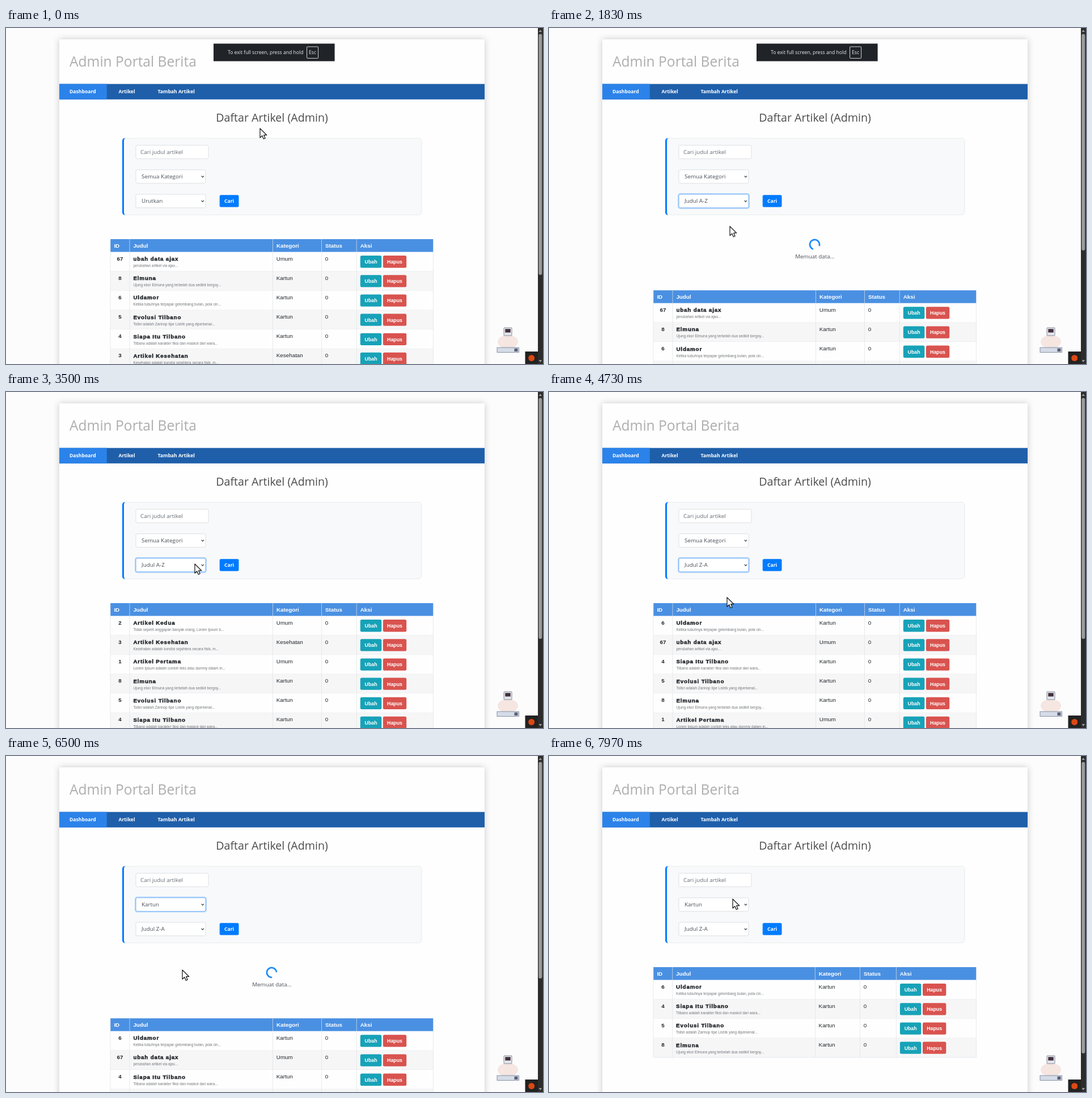
Write an HTML page that moves like this. It is 947x592 px and loops after 8000 ms.

```html
<!DOCTYPE html>
<html lang="id">
<head>
<meta charset="utf-8">
<title>Admin Portal Berita</title>
<style>
  html, body { margin: 0; width: 100%; height: 100%; overflow: hidden; background: #fcfcfd; }
  svg { display: block; width: 947px; height: 592px; }
  text { font: 9.83px "Open Sans", sans-serif; fill: #495057; white-space: pre; }
  .brand { font-size: 24.56px; fill: #aeaeae; }
  .heading { font-size: 19.65px; fill: #4c4c4c; text-anchor: middle; }
  .nav { font-size: 8.6px; font-weight: 700; fill: #fff; }
  .hint { font-size: 8.65px; fill: #eceef0; }
  .mid { text-anchor: middle; }
  .cell { font-family: "Liberation Sans", Arial, sans-serif; fill: #212529; }
  .bold { font-weight: 700; }
  .head { font-weight: 700; fill: #fff; }
  .title { font-weight: 700; letter-spacing: .83px; stroke: #212529; stroke-width: .45px; }
  .sub { font-size: 6.46px; fill: #74777b; }
  .btn { font-size: 8.8px; font-weight: 700; fill: #fff; text-anchor: middle; }
  .shadow { filter: drop-shadow(0 0 6px rgba(0, 0, 0, .2)); }
  #cursor { animation: move 8s infinite ease-in-out; }
  #banner { animation: leave 8s infinite linear; }
  @keyframes move {
    0%, 1.5% { transform: translate(448px, 177px); }
    12.125%, 14.5% { transform: translate(308px, 292px); }
    20.5%, 22% { transform: translate(318px, 350px); }
    30%, 36% { transform: translate(358px, 328px); }
    43.75%, 46% { transform: translate(333px, 303px); }
    50.5%, 60% { transform: translate(314px, 362px); }
    68%, 71% { transform: translate(322px, 257px); }
    79%, 84% { transform: translate(311px, 377px); }
    96%, 100% { transform: translate(324px, 252px); }
  }
  @keyframes leave {
    0%, 36% { opacity: 1; }
    38.5%, 99.99% { opacity: 0; }
    100% { opacity: 1; }
  }
</style>
</head>
<body>
<script>
const LOOP = 8000;
const percent = ms => (ms / LOOP * 100).toFixed(3) + '%';
let rules = '', ruleCount = 0;

function animate(frames, timing, content) {
  const name = 'k' + ruleCount++;
  rules += `@keyframes ${name}{${frames}} .${name}{animation:${name} ${LOOP}ms ${timing} infinite}`;
  return `<g class="${name}">${content}</g>`;
}

const during = (start, end, content) => animate(
  `0%{visibility:hidden}${percent(start)}{visibility:visible}${percent(end)}{visibility:${end < LOOP ? 'hidden' : 'visible'}}`,
  'step-end', content);

const rect = (x, y, w, h, fill, extra = '') =>
  `<rect x="${x}" y="${y}" width="${w}" height="${h}" fill="${fill}" ${extra}/>`;
const text = (x, y, content, cls = '') => `<text x="${x}" y="${y}" class="${cls}">${content}</text>`;
const line = (d, color, width = .7) => `<path d="${d}" fill="none" stroke="${color}" stroke-width="${width}"/>`;

const articles = {
  67: ['ubah data ajax', 'perubahan artikel via ajax...', 'Umum'],
  8: ['Elmuna', 'Ujung ekor Elmuna yang terbelah dua sedikit bergoy...', 'Kartun'],
  6: ['Uldamor', 'Ketika tubuhnya terpapar gelombang bulan, pola cin...', 'Kartun'],
  5: ['Evolusi Tilbano', 'Tolbri adalah Zarinop tipe Listrik yang diperkenal...', 'Kartun'],
  4: ['Siapa Itu Tilbano', 'Tilbano adalah karakter fiksi dan maskot dari wara...', 'Kartun'],
  3: ['Artikel Kesehatan', 'Kesehatan adalah kondisi sejahtera secara fisik, m...', 'Kesehatan'],
  2: ['Artikel Kedua', 'Tidak seperti anggapan banyak orang, Lorem Ipsum b...', 'Umum'],
  1: ['Artikel Pertama', 'Lorem Ipsum adalah contoh teks atau dummy dalam in...', 'Umum']
};
const LEFT = 184, RIGHT = 753.5, HEAD = 22.5, ROW = 34.15;
const wideColumns = [LEFT, 218, 470.5, 556.5, 618.3];
const kartunColumns = [LEFT, 217.7, 469.3, 548.5, 612.4];

function button(x, y, w, label, fill) {
  return rect(x, y, w, 21.3, fill, 'rx="2.5"') + text(x + w / 2, y + 14, label, 'cell btn');
}

function row(id, index, top, cols) {
  const [title, sub, category] = articles[id];
  const y = top + HEAD + index * ROW;
  return rect(LEFT, y, RIGHT - LEFT, ROW, index % 2 ? '#f6f6f7' : '#fefefe') +
    line(`M${LEFT} ${y + ROW}H${RIGHT}`, '#dee2e6') +
    text(201, y + 15, id, 'cell bold mid') +
    text(cols[1] + 6.4, y + 15.6, title, 'cell title') +
    text(cols[1] + 6.4, y + 26.6, sub, 'cell sub') +
    text(cols[2] + 6.3, y + 15, category, 'cell') +
    text(cols[3] + 6.3, y + 15, '0', 'cell') +
    button(cols[4] + 6.5, y + 6.6, 37.5, 'Ubah', '#17a2b8') +
    button(cols[4] + 46.6, y + 6.6, 41.3, 'Hapus', '#d9534f');
}

function table(ids, top, cols) {
  const bottom = top + HEAD + ids.length * ROW;
  const labels = ['ID', 'Judul', 'Kategori', 'Status', 'Aksi'];
  return ids.map((id, i) => row(id, i, top, cols)).join('') +
    rect(LEFT, top, RIGHT - LEFT, HEAD, '#4a90e2') +
    labels.map((label, i) => text(cols[i] + 6.4, top + 14.6, label, 'cell head')).join('') +
    [...cols, RIGHT].map(x => line(`M${x} ${top}V${bottom}`, '#dee2e6')).join('');
}

function spinner(start, end) {
  const turn = (end - start) / 750 * 360;
  const arc = line('M6.08 6.08A8.6 8.6 0 1 1 6.08 -6.08', '#007bff', 2.46);
  return `<g transform="translate(468.5 381.5)">${animate(
    `0%,${percent(start)}{transform:rotate(0deg)}${percent(end)},100%{transform:rotate(${turn}deg)}`, 'linear', arc)}</g>` +
    text(468.8, 406, 'Memuat data...', 'mid');
}

const thumb = bottom => rect(939.3, 10.5, 6, bottom - 10.5, '#9b9b9b', 'rx="3"');

function phase(start, end, ids, { loading = false, cols = wideColumns, thumbEnd = 435 } = {}) {
  const content = loading
    ? spinner(start, end) + table(ids, 462.2, cols) + thumb(392)
    : table(ids, 372, cols) + thumb(thumbEnd);
  return during(start, end, content);
}

const field = (y, w) => rect(229, y, w, 23.8, '#fff', 'rx="2.5" stroke="#d5d9dd" stroke-width=".8"');
const select = y => field(y, 123) + line(`M344.6 ${y + 10.8}l2.2 2.3l2.2 -2.3`, '#343a40', 1.2);
const focusRing = y =>
  rect(228, y - 1, 125, 25.8, 'none', 'rx="3.5" stroke="#007bff" stroke-opacity=".28" stroke-width="2"') +
  rect(229, y, 123, 23.8, 'none', 'rx="2.5" stroke="#80bdff" stroke-width=".9"');

const newest = [67, 8, 6, 5, 4, 3, 2, 1];
const ascending = [2, 3, 1, 8, 5, 4, 67, 6];
const descending = [6, 67, 4, 5, 8, 1, 3, 2];
const CATEGORY_Y = 249.8, SORT_Y = 293;

const page =
  rect(0, 0, 947, 592, '#fcfcfd') +
  rect(94, 20, 750, 620, '#fefefe', 'class="shadow"') +
  text(112, 68, 'Admin Portal Berita', 'brand') +
  rect(94, 98.6, 750, 27.2, '#1f5faa') + rect(94, 98.6, 83.8, 27.2, '#2b83ea') +
  text(112, 115.3, 'Dashboard', 'nav') + text(198.5, 115.3, 'Artikel', 'nav') +
  text(267.5, 115.3, 'Tambah Artikel', 'nav') +
  text(469, 164.6, 'Daftar Artikel (Admin)', 'heading');

const filters =
  rect(205.4, 194.2, 527.4, 135, '#f8f9fa', 'rx="5" stroke="#dee2e6" stroke-width=".7"') +
  '<path d="M210 194Q205 194 205 199V324.500Q205 329.500 210 329.500Q208 328 208 324.500V199Q208 195.500 210 194Z" fill="#007bff"/>' +
  field(206.6, 128) + '<g opacity=".85">' + text(237, 222, 'Cari judul artikel') + '</g>' +
  select(CATEGORY_Y) + select(SORT_Y) +
  rect(376.7, 294.2, 33.8, 21.2, '#007bff', 'rx="2.5"') + text(393.6, 308, 'Cari', 'nav mid') +
  during(0, 6415, text(239, 265.2, 'Semua Kategori')) +
  during(6415, LOOP, text(239, 265.2, 'Kartun')) +
  during(0, 1700, text(239, 308.4, 'Urutkan')) +
  during(1700, 4050, text(239, 308.4, 'Judul A-Z')) +
  during(4050, LOOP, text(239, 308.4, 'Judul Z-A')) +
  during(1150, 5600, focusRing(SORT_Y)) +
  during(5600, 7300, focusRing(CATEGORY_Y));

const scrollTrack = rect(938, 0, 9, 592, '#2c2c2c') +
  '<path d="M939.5 7L942.300 3L945.100 7ZM939.500 585L942.300 589L945.100 585Z" fill="#9b9b9b"/>';

const listing =
  phase(0, 1700, newest) +
  phase(1700, 2250, newest, { loading: true }) +
  phase(2250, 4050, ascending) +
  phase(4050, 4600, ascending, { loading: true }) +
  phase(4600, 6415, descending) +
  phase(6415, 6950, descending, { loading: true }) +
  phase(6950, LOOP, [6, 4, 5, 8], { cols: kartunColumns, thumbEnd: 524 });

const corner =
  '<ellipse cx="885" cy="553" rx="18" ry="12" fill="#f5e6e2"/>' +
  rect(878, 528, 14, 14, '#e4e6ee', 'rx="1" stroke="#6d7182" stroke-width=".8"') +
  rect(880.3, 530.3, 9.4, 6.2, '#42313a') +
  rect(866, 563, 38.500, 8.600, '#d5dbe8', 'stroke="#727b90" stroke-width=".8"') +
  rect(896.500, 564.600, 6, 5.400, '#596074') +
  rect(915.5, 570, 22.500, 22, '#222') +
  '<circle cx="926.7" cy="581.500" r="5.500" fill="#dd4814"/>';

const banner = '<g id="banner">' +
  rect(366, 27.5, 213.6, 31, '#202428') +
  text(391, 46.2, 'To exit full screen, press and hold', 'hint') +
  rect(530.6, 33, 20, 20.400, 'none', 'rx="1" stroke="#d5d7da" stroke-width="1"') +
  text(540.6, 46.2, 'Esc', 'hint mid') + '</g>';

const cursor = '<path id="cursor" d="M0 0V16.200L3.800 12.700L6.300 18.500L9.100 17.300L6.700 11.700H11.800Z" fill="#fff" stroke="#111" stroke-width="1.2" stroke-linejoin="round"/>';

const style = document.createElement('style');
style.textContent = rules;
document.head.append(style);
document.body.innerHTML =
  `<svg viewBox="0 0 947 592">${page}${filters}${scrollTrack}${listing}${corner}${banner}${cursor}</svg>`;
</script>
</body>
</html>
```
